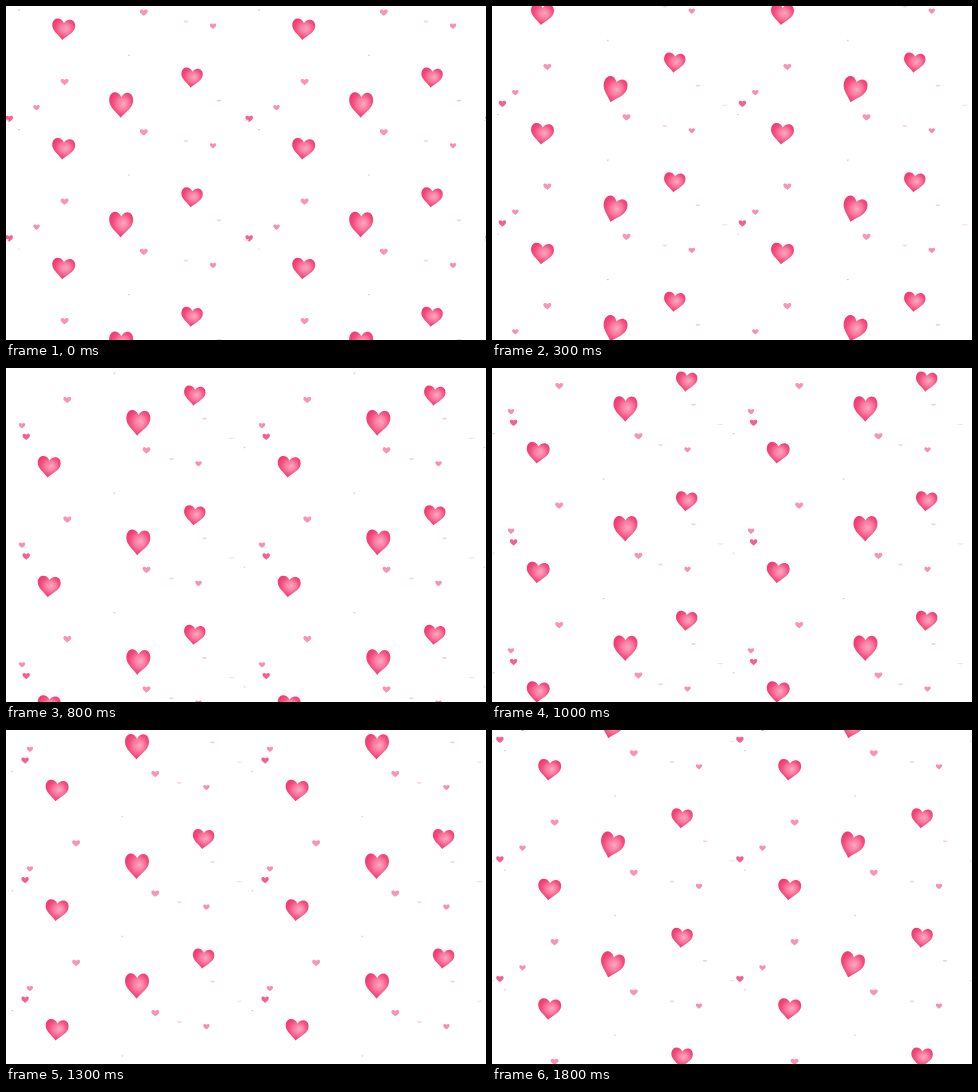
Animation, 480 px wide and 334 px high, one loop 2 s. Source, as an HTML page with a canvas:

```html
<!DOCTYPE html>
<html lang="en">
<head>
<meta charset="utf-8">
<title>Floating hearts</title>
<style>
html, body { margin: 0; width: 100%; height: 100%; overflow: hidden; background: #fff; }
canvas { display: block; }
</style>
</head>
<body>
<canvas id="stage" width="480" height="334"></canvas>
<script>
const ctx = document.getElementById('stage').getContext('2d');
const TILE_W = 240, TILE_H = 119.6, LOOP = 2000;

// [start in ms, pose]; half poses lie midway between two keys
const steps = [[0, 0], [200, .5], [300, 1], [500, 2], [600, 2.5], [800, 3],
  [1000, 4], [1200, 5], [1300, 5.5], [1500, 6], [1600, 6.5], [1800, 7]];

// Nine keys, the last one closing the loop
const rise = [0, 15, 29.3, 44, 58, 73.3, 91.3, 103, TILE_H];
const sway = {
  left: [0, -7.2, -14.5, -14.5, -11.5, -8.5, -4.7, 0, 0],
  wave: [0, -3.3, -3.3, 2.7, 8.6, 14.5, 8.5, 4, 0],
  right: [0, 7.2, 14.5, 17, 18.4, 19.5, 12.3, 4.7, 0]
};
const spin = [2, 17, 17, 4, 1, -1, 4, 16, 2];
const still = Array(9).fill(6);

const hearts = [
  { x: 57.3, y: 23.3, w: 23, h: 21.5, path: sway.left, turn: still, big: true },
  { x: 185.7, y: 71.7, w: 21.5, h: 20, path: sway.wave, turn: still, big: true },
  { x: 115, y: 98.8, w: 24, h: 26, path: sway.right, turn: spin, big: true },
  { x: 137.8, y: 6.7, w: 8, h: 6.5, path: sway.wave, color: '#f895b6' },
  { x: 58.6, y: 76, w: 8, h: 6.5, path: sway.wave, color: '#f895b6' },
  { x: 207, y: 20.2, w: 6.5, h: 5.5, path: sway.left, color: '#f78fb2' },
  { x: 30.5, y: 101.6, w: 6.5, h: 5.5, path: sway.left, color: '#f78fb2' },
  { x: 3.2, y: 112.8, w: 7.5, h: 6.5, path: sway.right, color: '#f4608f' },
  { x: 180, y: 15.6, w: 5, h: 2.5, path: sway.left, color: '#f6dbe2' },
  { x: 213, y: 94.8, w: 4.5, h: 2, path: sway.left, color: '#f3cdd8' },
  { x: 123, y: 49.6, w: 2, h: 1.6, path: sway.left, color: '#e8c4cc' },
  { x: 13, y: 4.2, w: 2, h: 1.6, path: sway.left, color: '#e8c4cc' },
  { x: 240, y: 114.5, w: 6, h: 1.6, path: sway.left, color: '#f7e0e6' }
];

const shine = ctx.createRadialGradient(.22, -.1, 0, .1, -.05, 1.05);
shine.addColorStop(0, '#fda9bf');
shine.addColorStop(.4, '#fa7fa3');
shine.addColorStop(.75, '#f74d80');
shine.addColorStop(1, '#ee3f74');

const outline = new Path2D('M0 1C-.3 .6-1 .25-1-.35C-1-1.05-.3-1.15 0-.6' +
  'C.3-1.15 1-1.05 1-.35C1 .25 .3 .6 0 1Z');

function at(keys, pose) {
  const i = Math.floor(pose);
  return keys[i] + (keys[i + 1] - keys[i]) * (pose - i);
}

function drawHeart(heart, x, y, pose) {
  ctx.save();
  ctx.translate(x, y);
  if (heart.turn) ctx.rotate(at(heart.turn, pose) * Math.PI / 180);
  ctx.scale(heart.w / 2, heart.h / 2);
  ctx.fillStyle = heart.big ? shine : heart.color;
  ctx.fill(outline);
  ctx.restore();
}

function draw(now) {
  const time = now % LOOP;
  const pose = steps.findLast(([start]) => start <= time)[1];
  ctx.fillStyle = '#fff';
  ctx.fillRect(0, 0, 480, 334);
  for (const heart of hearts) {
    const x = heart.x + at(heart.path, pose);
    const y = heart.y - at(rise, pose);
    for (let col = -1; col < 3; col++)
      for (let row = -1; row < 5; row++)
        drawHeart(heart, x + col * TILE_W, y + row * TILE_H, pose);
  }
}

const begin = performance.now();
function frame() {
  draw(performance.now() - begin);
  requestAnimationFrame(frame);
}
frame();
</script>
</body>
</html>
```
